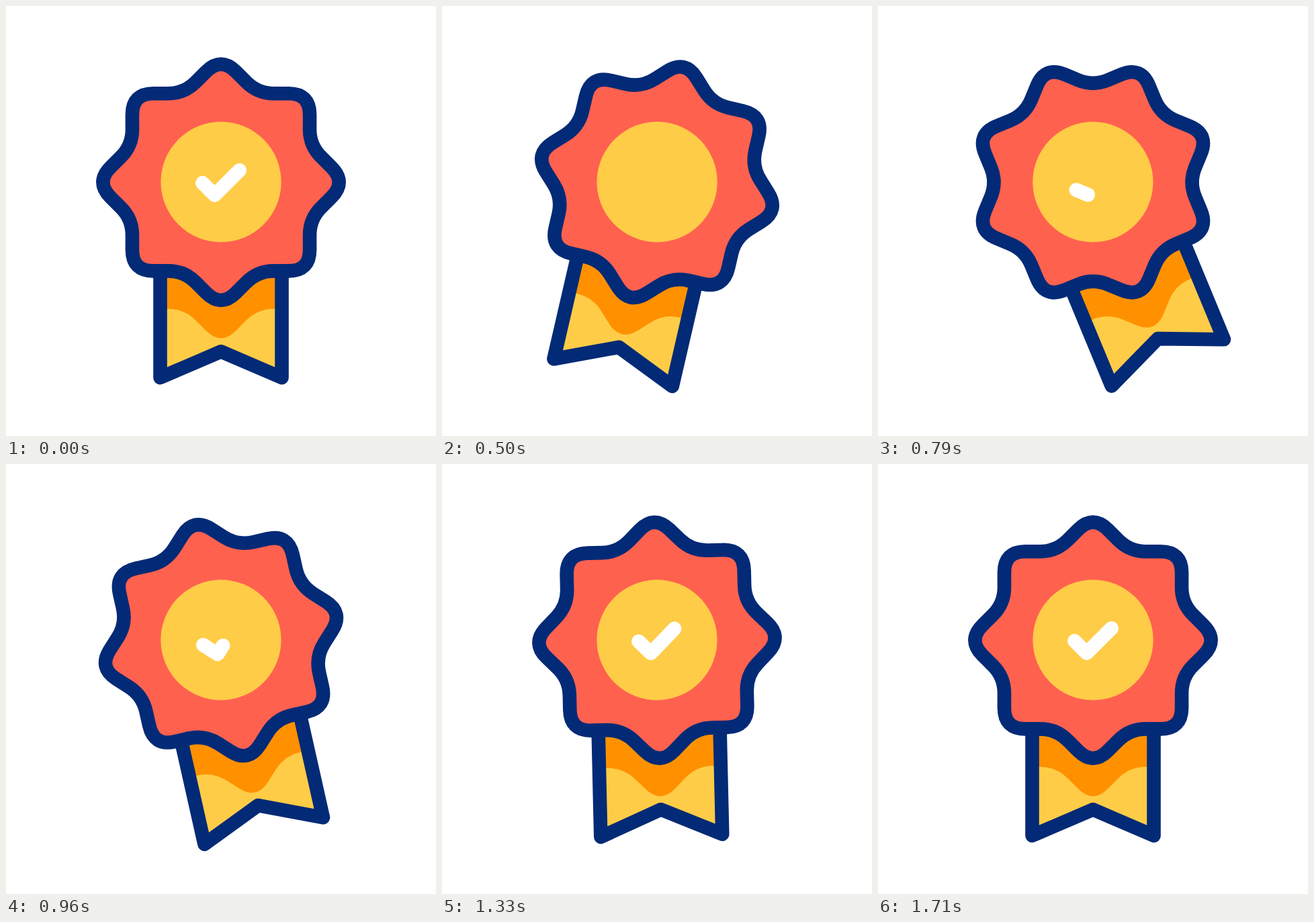
Write an HTML page that moves like this. It is 640 px wide and 640 px high and loops after 2.04 s.

```html
<!DOCTYPE html>
<html lang="en">
<head>
<meta charset="utf-8">
<title>Award badge</title>
<style>
  html, body { margin: 0; width: 100%; height: 100%; overflow: hidden; background: #fff; }
  svg { display: block; width: 100%; height: 100%; }
  .line { stroke: #032a76; stroke-width: 20.6; stroke-linecap: round; stroke-linejoin: round; }
</style>
</head>
<body>
<svg viewBox="0 0 640 640">
  <defs>
    <path id="star"/>
    <path id="ribbon" d="M-90.5 100V290.8L0 252L90.5 290.8V100Z"/>
    <clipPath id="inRibbon"><use href="#ribbon"/></clipPath>
  </defs>
  <g transform="translate(320 262.3)">
    <g id="badge">
      <use href="#ribbon" fill="#ffcc47"/>
      <g clip-path="url(#inRibbon)"><use href="#star" y="56.5" fill="#ff9100"/></g>
      <use href="#ribbon" class="line" fill="none"/>
      <use href="#star" class="line" fill="#ff614f"/>
      <circle cy="-.4" r="89.6" fill="#ffcc47"/>
      <path id="check" d="M-27.5 1L-9.4 19.1L27.5 -17.8" pathLength="1" fill="none"
        stroke="#fff" stroke-width="21" stroke-linecap="round" stroke-linejoin="round"/>
    </g>
  </g>
</svg>
<script>
const LOOP = 2040;
const badge = document.getElementById('badge');
const check = document.getElementById('check');

// Eight-pointed star with each corner rounded by a quadratic curve.
function starPath() {
  const corner = i => {
    const r = i % 2 ? 142.9 : 186.8, a = i * Math.PI / 8;
    return [r * Math.sin(a), -r * Math.cos(a)];
  };
  const toward = ([x, y], [u, v], d) => {
    const k = d / Math.hypot(u - x, v - y);
    return [x + (u - x) * k, y + (v - y) * k];
  };
  let d = '';
  for (let i = 0; i < 16; i++) {
    const p = corner(i), cut = i % 2 ? 24 : 31.5;
    d += `${i ? 'L' : 'M'}${toward(p, corner(i - 1), cut)}Q${p} ${toward(p, corner(i + 1), cut)}`;
  }
  return d + 'Z';
}
document.getElementById('star').setAttribute('d', starPath());

const progress = (f, from, to) => Math.min(1, Math.max(0, (f - from) / (to - from)));
const ease = t => t * t * (3 - 2 * t);

// Swing keys: [step, degrees]
const swing = [[4, 0], [12, 13], [20, -24.1], [27, 5], [34, -2.9], [41, 0]];

function angleAt(f) {
  let angle = 0;
  for (let i = 1; i < swing.length; i++) {
    const [from, a] = swing[i - 1], [to, b] = swing[i];
    angle += (b - a) * ease(progress(f, from, to));
  }
  return angle;
}

// The tick is wiped back to its start, then drawn again.
function tickAt(f) {
  if (f < 15) return 1 - ease(progress(f, 2, 8.3));
  const t = progress(f, 15, 34);
  return t + t * t - t * t * t;
}

function draw(now) {
  // 24 steps per second, aligned to hundredths of a second
  const f = Math.floor((Math.floor(now % LOOP / 10) + 0.49) * 0.24);
  const tick = tickAt(f);
  badge.setAttribute('transform', `rotate(${angleAt(f)})`);
  check.setAttribute('stroke-dasharray', `${tick} 2`);
  check.setAttribute('visibility', tick > 0 ? 'visible' : 'hidden');
  requestAnimationFrame(draw);
}
draw(performance.now());
</script>
</body>
</html>
```
